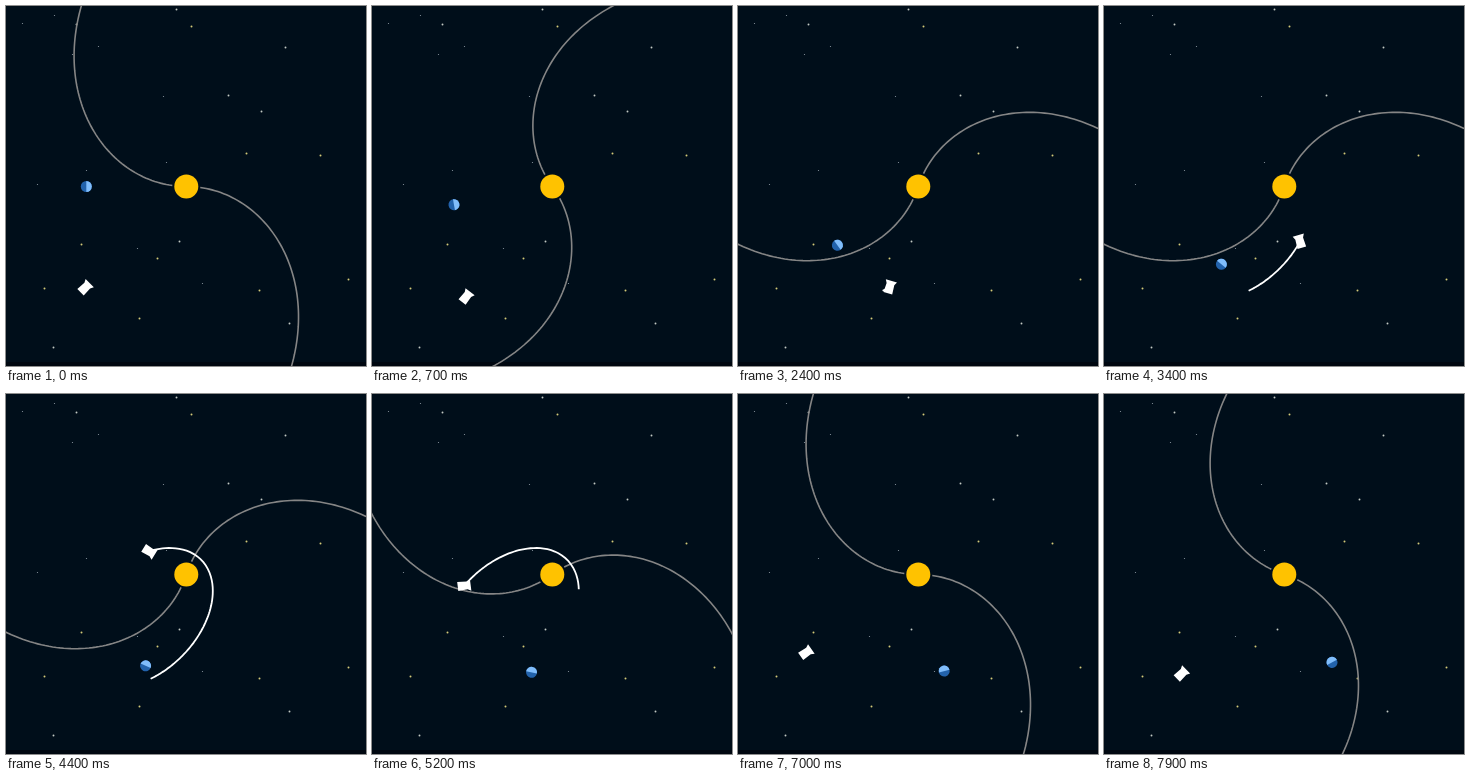
Write an HTML page that moves like this. It is 360 px wide and 360 px high and loops after 8 s.

```html
<!DOCTYPE html>
<html lang="en">
<head>
<meta charset="utf-8">
<title>Solar probe orbit</title>
<style>
  html, body { margin: 0; width: 100%; height: 100%; overflow: hidden; background: #000e1a; }
  svg { display: block; width: 100%; height: 100%; }
</style>
</head>
<body>
<svg viewBox="0 0 360 360">
  <rect width="360" height="360" fill="#000e1a"/>
  <rect y="356" width="360" height="4" fill="#000710"/>
  <g id="stars"></g>
  <g transform="translate(180.3 180.5)">
    <g id="spiral" fill="none" stroke="#858585" stroke-width="1.6">
      <path id="arm"/>
      <use href="#arm" transform="rotate(180)"/>
    </g>
    <path id="trail" fill="none" stroke="#fff" stroke-width="1.8"/>
    <circle r="12" fill="#ffc200"/>
    <g id="planet">
      <circle r="5.5" fill="#2262ab"/>
      <path d="M0-5.5A5.5 5.5 0 0 1 0 5.5Z" fill="#80bdfb"/>
    </g>
    <path id="probe" d="M6.5-5.8V5.8L3 4L-6.5 4.5V-4.5L3-4Z" fill="#fff"/>
  </g>
</svg>
<script>
const LOOP = 8000, STEP = 100;
const ORBIT = { a: 82, e: 0.745, tilt: 135 };
const TRAIL_START = 2230, TRAIL_RETRACT = 4420;
const rad = Math.PI / 180;
const el = id => document.getElementById(id);
const toPath = points => points.length > 1
  ? 'M' + points.map(p => p.map(v => v.toFixed(2)).join(' ')).join('L') : '';

const starGroups = [
  { color: '#8d98a3', size: 1, at: [[48, 9], [16, 17], [92, 40], [66, 48], [157, 90], [160, 156],
    [80, 164], [31, 178], [131, 242], [196, 277]] },
  { color: '#c3c9c4', size: 1.7, at: [[170, 3], [70, 18], [173, 235], [47, 341], [283, 317],
    [279, 41], [222, 89], [255, 105]] },
  { color: '#d3ca78', size: 1.8, at: [[185, 20], [240, 147], [314, 149], [75, 238], [151, 252],
    [38, 282], [253, 284], [342, 273], [133, 312]] }
];
el('stars').innerHTML = starGroups.map(({ color, size, at }) => at.map(([x, y]) =>
  `<circle cx="${x + 0.5}" cy="${y + 0.5}" r="${size / 2 + 0.1}" fill="${color}"/>`).join('')).join('');

// Archimedean arm: the radius grows 200 px per radian.
const arm = [];
for (let r = 14; r <= 290; r += 3) arm.push([r * Math.cos(r / 200), r * Math.sin(r / 200)]);
el('arm').setAttribute('d', toPath(arm));

// Kepler orbit around the sun, aphelion at t = 0.
function probeAt(t) {
  const { a, e, tilt } = ORBIT;
  const mean = 2 * Math.PI * t / LOOP - Math.PI;
  let E = mean + e * Math.sin(mean);
  for (let i = 0; i < 8; i++) E -= (E - e * Math.sin(E) - mean) / (1 - e * Math.cos(E));
  const x = a * (e - Math.cos(E));
  const y = a * Math.sqrt(1 - e * e) * Math.sin(E);
  const c = Math.cos(tilt * rad), s = Math.sin(tilt * rad);
  return [x * c - y * s, x * s + y * c];
}

function trailPoints(t) {
  const tail = TRAIL_START + 2 * Math.max(0, t - TRAIL_RETRACT);
  const points = [];
  for (let u = tail; u < t; u += 25) points.push(probeAt(u));
  if (points.length) points.push(probeAt(t));
  return points;
}

function place(id, [x, y]) {
  const facingSun = Math.atan2(-y, -x) / rad;
  el(id).setAttribute('transform', `translate(${x} ${y}) rotate(${facingSun})`);
}

function draw(t) {
  const angle = (180 - 15 * t / 1000) * rad;
  el('spiral').setAttribute('transform', `rotate(${-180 * t / 1000})`);
  place('planet', [100 * Math.cos(angle), 100 * Math.sin(angle)]);
  place('probe', probeAt(t));
  el('trail').setAttribute('d', toPath(trailPoints(t)));
}

const start = performance.now();
function tick() {
  const t = (performance.now() - start) % LOOP;
  draw(Math.floor(t / STEP) * STEP);
  requestAnimationFrame(tick);
}
tick();
</script>
</body>
</html>
```
